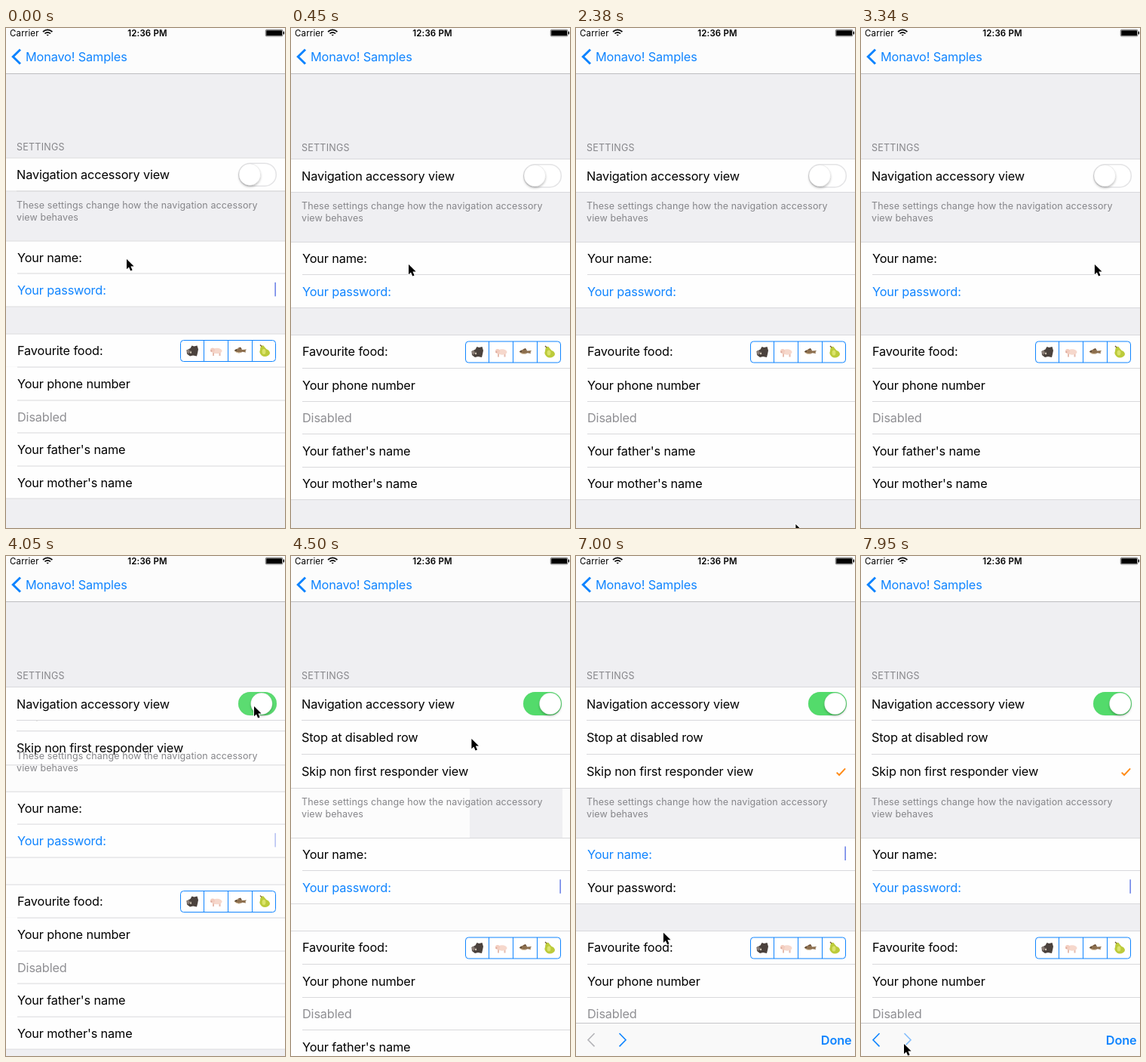
These frames come from a looping animation (370 by 662 pixels, 8000 ms). An HTML page:

```html
<!DOCTYPE html>
<html lang="en">
<head>
<meta charset="utf-8">
<title>Form settings</title>
<style>
html, body { margin: 0; width: 100%; height: 100%; overflow: hidden; background: #efeff2; }
svg { display: block; width: 100vw; height: 100vh; }
text { font: 16.3px Inter, "Noto Sans", sans-serif; letter-spacing: -.14px; white-space: pre; }
.small { font-size: 12.5px; letter-spacing: .11px; fill: #86868a; }
.status { font-size: 11.5px; letter-spacing: .15px; }
.bold { font-weight: 600; }
.blue { fill: #0f84ff; }
.line { fill: none; stroke: #0f84ff; }
.caret { fill: #667de6; }
</style>
</head>
<body>
<svg viewBox="0 0 370 662">
  <defs>
    <filter id="soft" x="-50%" y="-50%" width="200%" height="200%">
      <feDropShadow dx="0" dy="2" stdDeviation="1.5" flood-opacity=".25"/>
    </filter>
  </defs>
  <rect width="370" height="662" fill="#efeff2"/>
  <g id="page">
    <text class="small" x="14" y="163" style="letter-spacing:.25px">SETTINGS</text>
    <g id="footPale">
      <rect y="217" width="370" height="157" fill="#fcfcfc"/>
      <rect id="footHole" x="237" y="307" width="123" height="66" fill="#efeff2"/>
    </g>
    <g id="stop"></g>
    <g id="skip"></g>
    <g id="nav"></g>
    <g id="switch">
      <rect x="308.7" y="180.7" width="49.6" height="30" rx="15" fill="#fff" stroke="#e3e3e5" stroke-width="1.5"/>
      <rect id="track" x="308" y="180" width="51" height="31" rx="15.5" fill="#53db6b"/>
      <circle id="knob" cy="195.5" r="14.3" fill="#fff" stroke="#000" stroke-opacity=".07" filter="url(#soft)"/>
    </g>
    <g id="lower">
      <text class="small" x="14" y="240">These settings change how the navigation accessory</text>
      <text class="small" x="14" y="256">view behaves</text>
      <rect id="gapPale" y="370" width="370" height="37" fill="#fcfcfc"/>
      <g id="rows"></g>
      <rect id="nameCaret" class="caret" x="356.4" y="294.5" width="1.5" height="18.5"/>
      <rect id="passCaret" class="caret" x="356.4" y="338.3" width="1.5" height="18.5"/>
      <g class="line">
        <rect x="231.5" y="415" width="126" height="28" rx="4" fill="#fff"/>
        <path d="M262.5 415v28M294.5 415v28M326.5 415v28"/>
      </g>
      <!-- boar -->
      <path d="M239.5 428l5-2.5 2-3.5 3 1 4-1 1.5 5-1 5-1 4-5-1-4 1-4-3z" fill="#4b423d"/>
      <path d="M239.5 428l3.5-1 1 4-3 2z" fill="#8a7d76"/>
      <path d="M244 432l1-3.5 1.2 3.5z" fill="#f3ead6"/>
      <!-- pig -->
      <path d="M274 431v4.5h2v-3.5h6.5v3.5h2v-6z" fill="#e6bcae"/>
      <ellipse cx="280" cy="429" rx="6.5" ry="3.7" fill="#f6d8cc"/>
      <circle cx="274" cy="428" r="3" fill="#f3cdbf"/>
      <circle cx="272.3" cy="429" r="1" fill="#d9a598"/>
      <!-- fish -->
      <path d="M302.5 428.5q5-5 11-1l5.5-.5-1.5 2 .5 2-4.5-.8q-6 3.800-11-1.700z" fill="#8d6f4e"/>
      <path d="M303 429.300q5 3 9.500 1l-3 2q-4 0-6.500-3z" fill="#dfcdb0"/>
      <path d="M307 425.500l4-1.500 2 3z" fill="#6a4d31"/>
      <circle cx="305" cy="428" r=".8" fill="#222"/>
      <!-- pear -->
      <path d="M338 423q3-3 5 1 2 3 5 4 4 4 0 7-5 3-9 0-4-4-2-7 0-3 1-5z" fill="#bccb3a"/>
      <ellipse cx="342" cy="430" rx="2.4" ry="3.5" fill="#dbe36b"/>
      <path d="M339 423l-2-2" stroke="#70572c" stroke-width="1.2"/>
    </g>
  </g>

  <rect width="370" height="60" fill="#fcfcfc"/>
  <rect y="60" width="370" height="1" fill="#bdbdc0"/>
  <text class="status" x="5" y="10.5">Carrier</text>
  <g fill="none" stroke="#000" stroke-width="1.7">
    <path d="M49 5q6.2-5.2 12.4 0M51.4 7.4q3.8-3 7.6 0"/>
    <path d="M53.4 8.8h3.6l-1.8 1.8z" fill="#000" stroke="none"/>
  </g>
  <text class="status bold" x="187.5" y="10.5" text-anchor="middle">12:36 PM</text>
  <rect x="344.3" y="2.300" width="22.6" height="8.600" rx="1.5" fill="none" stroke="#000" stroke-width=".6"/>
  <rect x="345.200" y="3.200" width="20.8" height="6.800" rx=".6"/>
  <rect x="367.6" y="4.7" width="1.4" height="3.6"/>
  <path class="line" d="M19 28.5L9.3 38l9.7 9.5" stroke-width="3"/>
  <text class="blue" x="26" y="44">Monavo! Samples</text>

  <g id="bar">
    <rect y="618" width="370" height="45" fill="#f9f9f9"/>
    <rect y="618" width="370" height="1" fill="#c6c6c9"/>
    <path id="prev" class="line" d="M24.5 632l-8.5 8.7 8.5 8.7" stroke-width="1.6"/>
    <path id="next" class="line" d="M57.5 632l8.5 8.7-8.5 8.7" stroke-width="1.6"/>
    <text class="blue bold" x="365.5" y="647" text-anchor="end">Done</text>
  </g>
  <path id="cursor" d="M0 0v13.2l3-2.8 2.2 5 2.4-1-2.2-4.9h4.2z" stroke="#fff" stroke-width="1.8" paint-order="stroke"/>
</svg>
<script>
const $ = id => document.getElementById(id);
const LOOP = 8000, BLUE = '#0f84ff';

const rule = (x, y) => `<rect x="${x}" y="${y}" width="${370 - x}" height="1" fill="#d9d9dc"/>`;
const row = (y, h, label, x = 15, id = '', color = '#000') =>
  `<rect y="${y}" width="370" height="${h}" fill="#fefefe"/>` +
  `<text x="${x}" y="${y + h / 2 + 6}" fill="${color}" ${id && `id="${id}"`}>${label}</text>`;

$('nav').innerHTML = row(173, 45, 'Navigation accessory view', 14) + rule(0, 173) + rule(14, 217)
  + `<g id="navEdge">${rule(0, 217)}</g>`;
$('stop').innerHTML = row(217, 45, 'Stop at disabled row', 14) + rule(14, 262);
$('skip').innerHTML = row(262, 45, 'Skip non first responder view', 14)
  .replace('<text', '<rect id="press" y="262" width="370" height="45" fill="#d9d9d9"/><text')
  + rule(0, 307) + rule(14, 262)
  + '<path id="check" d="M345.7 286.6l3.4 3.4 8-8.6" fill="none" stroke="#ff8c1a" stroke-width="2"/>';
$('rows').innerHTML =
  row(283, 44, 'Your name:', 15, 'name') + row(326, 45, 'Your password:', 15, 'pass') +
  row(406, 44, 'Favourite food:') + row(450, 45, 'Your phone number') +
  row(494, 44, 'Disabled', 15, '', '#8f8f93') + row(537, 45, "Your father's name") +
  row(581, 44, "Your mother's name") +
  [283, 370, 406, 624].map(y => rule(0, y)).join('') +
  [326, 450, 494, 537, 581].map(y => rule(15, y)).join('');

// time, x, y of the pointer tip
const path = [
  [0, 160, 306], [50, 160, 306], [450, 156, 313], [990, 156, 313], [1490, 150, 345],
  [1740, 75, 508], [1800, 65, 522], [2000, 32, 625], [2200, 240, 667], [2379, 240, 667],
  [2380, 292, 657], [2800, 20, 640], [3170, 301, 366], [3230, 301, 366], [3580, 329, 199],
  [4120, 329, 199], [4500, 239.5, 242], [4620, 228, 246], [4980, 228, 246], [5250, 214, 284],
  [5610, 207, 277], [5770, 207, 277], [6110, 169, 400], [6750, 169, 400], [7360, 40, 640],
  [7480, 40, 640], [7800, 57, 646], [LOOP, 57, 646]
];
// each focus change restarts the caret's blink
const focus = [[-250, 'pass'], [750, 'name'], [1490, 'pass'], [5300, ''], [6650, 'name'], [7880, 'pass']];

const clamp = v => Math.max(0, Math.min(1, v));
const ramp = (t, start, length) => clamp((t - start) / length);
const ease = (t, start, length) => { const p = ramp(t, start, length); return p * p * (3 - 2 * p); };
const fade = (id, v) => $(id).setAttribute('opacity', v);
const move = (id, x, y) => $(id).setAttribute('transform', `translate(${x} ${y})`);

function draw(t) {
  move('page', 0, -1.5 * (1 - ease(t, 50, 400)));

  const on = ease(t, 3880, 250), open = ease(t, 3927, 330);
  $('knob').setAttribute('cx', 323.3 + 20.4 * on);
  fade('track', clamp(on * 1.25));
  fade('navEdge', +(open === 0));
  move('stop', 0, -45 * (1 - open));
  move('skip', 0, -45 * (1 - open));
  fade('stop', +(open > 0));
  fade('skip', clamp(open * 5));
  move('lower', 0, 90 * open);
  fade('footPale', +(t > 3930 && t < 5050));
  $('footPale').firstElementChild.setAttribute('height', 66 + 90 * open);
  fade('footHole', +(t > 4400));
  fade('gapPale', +(t > 3930 && t < 6700));

  fade('press', t < 5200 ? 0 : 1 - ramp(t, 5350, 400));
  fade('check', +(t >= 5300));

  const [since, field] = focus.filter(f => f[0] <= t).pop();
  const caret = clamp((600 - (t - since) % 1000) / 80);
  for (const id of ['name', 'pass']) {
    $(id).setAttribute('fill', field === id ? BLUE : '#000');
    fade(id + 'Caret', field === id ? caret : 0);
  }

  move('bar', 0, 45 * (1 - ease(t, 6680, 280)));
  $('prev').style.stroke = field === 'name' ? '#b4b4b8' : BLUE;
  fade('next', t > 7840 ? .5 : 1);

  const i = path.findIndex(k => k[0] > t), [t0, x0, y0] = path[i - 1], [t1, x1, y1] = path[i];
  const p = ramp(t, t0, t1 - t0);
  move('cursor', x0 + (x1 - x0) * p, y0 + (y1 - y0) * p);
}

const begin = performance.now();
function tick() {
  draw((performance.now() - begin) % LOOP);
  requestAnimationFrame(tick);
}
tick();
</script>
</body>
</html>
```
